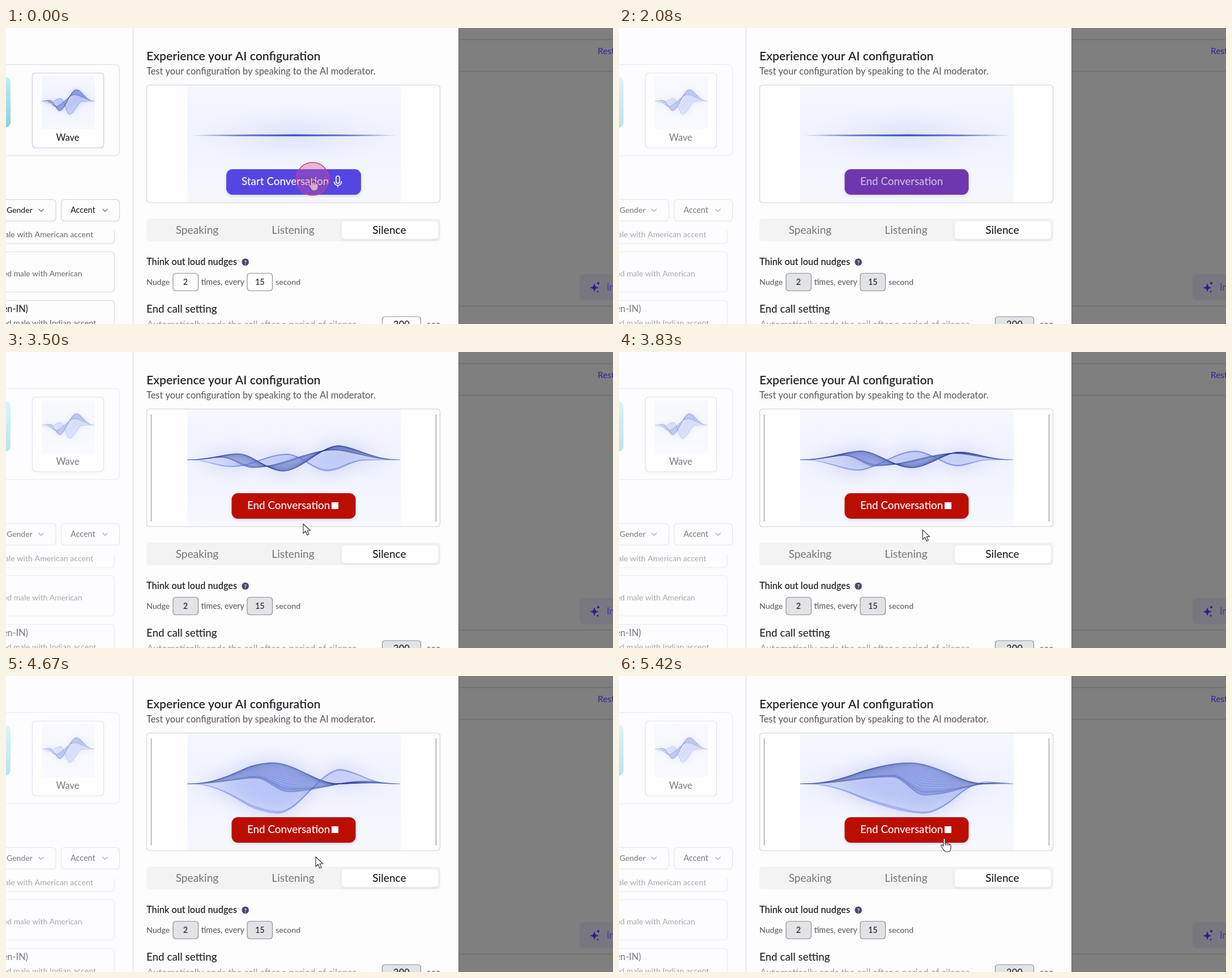
An HTML page with a canvas for the animation above (5.5 s loop, 1072 px wide and 522 px high).

```html
<!DOCTYPE html>
<html lang="en">
<head>
<meta charset="utf-8">
<title>Voice configuration test</title>
<style>
html, body { margin: 0; width: 100%; height: 100%; overflow: hidden; background: #fdfdfe; }
canvas { display: block; width: 1072px; height: 522px; }
</style>
</head>
<body>
<canvas id="stage" width="1072" height="522"></canvas>
<script>
const ctx = document.getElementById('stage').getContext('2d');
const LOOP = 5500, DISABLED_AT = 2080, VIDEO_AT = 2830, CURSOR_AT = 3420;
const INK = '#26262b', GREY = '#66666c', BORDER = '#dedee3';

const clamp = v => Math.max(0, Math.min(1, v));
const mix = (a, b, s) => a + (b - a) * s;
const smooth = s => s * s * (3 - 2 * s);
const linear = s => s;

function keyed(t, times, values, ease = smooth) {
  let i = 0;
  while (i < times.length - 2 && t > times[i + 1]) i++;
  return mix(values[i], values[i + 1], ease(clamp((t - times[i]) / (times[i + 1] - times[i]))));
}

function text(str, x, y, size, color = INK, weight = 400, align = 'left') {
  ctx.font = `${weight} ${size}px Lato, "Open Sans", sans-serif`;
  ctx.fillStyle = color;
  ctx.textAlign = align;
  ctx.fillText(str, x, y);
}

function box(x, y, w, h, r, fill, stroke, shadow) {
  ctx.save();
  ctx.beginPath();
  ctx.roundRect(x, y, w, h, r);
  if (shadow) {
    ctx.shadowColor = shadow;
    ctx.shadowBlur = 5;
    ctx.shadowOffsetY = 2;
  }
  if (fill) { ctx.fillStyle = fill; ctx.fill(); }
  ctx.shadowColor = 'transparent';
  if (stroke) { ctx.strokeStyle = stroke; ctx.lineWidth = 1.2; ctx.stroke(); }
  ctx.restore();
}

function line(points, color, width = 1) {
  ctx.beginPath();
  points.forEach(([x, y]) => ctx.lineTo(x, y));
  ctx.strokeStyle = color;
  ctx.lineWidth = width;
  ctx.stroke();
}

// Each crest: offset at 3 s, speed in px/s, heights at the key times.
const KEYS = [3000, 3500, 4170, 4670, 5420];
const TOP = [
  [58, 56, [6, 12, 20, 37, 37]],
  [127, 84, [-43, -20, -8, 0, 0]],
  [242, 54, [51, 25, 4, 2, 0]]
];
const MIDDLE = [
  [30, 55, [3, 6, 12, 10, 12]],
  [88, 54, [-25, -14, -8, -14, -20]],
  [232, 54, [27, 17, 6, 6, 4]]
];
const BOTTOM = [
  [30, 78, [-14, -15, -25, -52, -52]],
  [135, 82, [12, 10, 21, 26, 5]],
  [197, 100, [-60, -20, -3, 0, 0]],
  [288, 54, [-1, -1, 0, 0, 0]]
];
const SPAN = 377, STEP = 4;

// The envelope pinches both tails to a point.
function strand(crests, t) {
  const xs = [0], hs = [0], out = [];
  for (const [x, speed, heights] of crests) {
    xs.push(Math.min(x + speed * (t - 3000) / 1000, 374));
    hs.push(keyed(t, KEYS, heights));
  }
  xs.push(SPAN);
  hs.push(0);
  for (let u = 0; u <= SPAN + 1; u += STEP) {
    const tail = clamp(Math.min(u, SPAN - u) / 110);
    out.push(keyed(u, xs, hs) * Math.sqrt(tail));
  }
  return out;
}

function drawWave(t, x, y, sx, sy) {
  const [top, mid, low] = [TOP, MIDDLE, BOTTOM].map(c => strand(c, t));
  const trace = hs => hs.forEach((h, i) => ctx.lineTo(x + i * STEP * sx, y - h * sy));
  const fade = rgb => {
    const g = ctx.createLinearGradient(x, 0, x + SPAN * sx, 0);
    [[0, .1], [.12, .55], [.3, 1], [.75, 1], [.9, .4], [1, .05]]
      .forEach(([p, a]) => g.addColorStop(p, `rgba(${rgb},${a})`));
    return g;
  };
  const blend = (a, b, s) => a.map((h, i) => mix(h, b[i], s));
  const surface = (a, b, color, alpha, blur = 0) => {
    ctx.save();
    if (blur) ctx.filter = `blur(${blur}px)`;
    ctx.globalAlpha *= alpha;
    ctx.fillStyle = color;
    ctx.beginPath();
    trace(a);
    for (let i = b.length - 1; i >= 0; i--) ctx.lineTo(x + i * STEP * sx, y - b[i] * sy);
    ctx.fill();
    ctx.restore();
  };
  const threads = (a, b, count, color, alpha, power) => {
    ctx.save();
    ctx.globalAlpha *= alpha;
    ctx.strokeStyle = color;
    ctx.lineWidth = Math.max(.5, 1.3 * sx);
    for (let i = 0; i <= count; i++) {
      ctx.beginPath();
      trace(blend(a, b, (i / count) ** power));
      ctx.stroke();
    }
    ctx.restore();
  };
  const blue = fade('82,112,214'), navy = fade('38,58,142');
  surface(top, low, '#8c9ef5', .42, 16 * sx);
  surface(top, low, fade('130,152,240'), .16);
  surface(top, mid, blue, .34);
  threads(mid, low, 14, blue, .08, 1);
  threads(top, mid, 20, navy, .2, 2.2);
  threads(mid, blend(mid, top, .15), 3, navy, .2, 1);
  threads(low, blend(low, mid, .08), 4, blue, .26, 1);
}

function videoBackground(x, y, w, h) {
  const g = ctx.createLinearGradient(0, y, 0, y + h);
  g.addColorStop(0, '#f5f7fe');
  g.addColorStop(.43, '#f0f3fd');
  g.addColorStop(1, '#f6f8fe');
  ctx.fillStyle = g;
  ctx.fillRect(x, y, w, h);
}

function flatLine() {
  const glow = ctx.createRadialGradient(0, 0, 0, 0, 0, 180);
  glow.addColorStop(0, 'rgba(200,210,250,.5)');
  glow.addColorStop(1, 'rgba(225,231,252,0)');
  ctx.save();
  ctx.translate(508, 189);
  ctx.scale(1, .3);
  ctx.fillStyle = glow;
  ctx.fillRect(-180, -180, 360, 360);
  ctx.restore();
  const g = ctx.createLinearGradient(330, 0, 688, 0);
  [[0, .15], [.25, .8], [.5, 1], [.75, .8], [1, .15]]
    .forEach(([p, a]) => g.addColorStop(p, `rgba(63,91,190,${a})`));
  ctx.fillStyle = g;
  ctx.beginPath();
  ctx.ellipse(509, 189.3, 179, 1.7, 0, 0, 7);
  ctx.fill();
}

function clipped(x, y, w, h, draw) {
  ctx.save();
  ctx.beginPath();
  ctx.rect(x, y, w, h);
  ctx.clip();
  draw();
  ctx.restore();
}

function sparkle(x, y, r) {
  ctx.beginPath();
  ctx.moveTo(x, y - r);
  for (const [dx, dy] of [[1, 0], [0, 1], [-1, 0], [0, -1]])
    ctx.quadraticCurveTo(x, y, x + dx * r, y + dy * r);
  ctx.lineWidth = 1.5;
  ctx.strokeStyle = ctx.fillStyle = '#37188f';
  ctx.fill();
  ctx.stroke();
}

function backdrop() {
  ctx.fillStyle = '#7f7f7f';
  ctx.fillRect(799, 0, 273, 522);
  [20.5, 76.5, 490.5].forEach(y => line([[799, y], [1072, y]], '#707072', 1.3));
  text('Restart', 1045, 46, 15.4, '#392b91', 500);
  box(1013, 434, 90, 46, 8, '#78777f');
  sparkle(1039, 458, 6.5);
  sparkle(1046, 450, 2.2);
  sparkle(1045, 465, 1.5);
  text('Insights', 1061, 463, 16.5, '#483c96', 500);
  const g = ctx.createLinearGradient(799, 0, 803, 0);
  g.addColorStop(0, 'rgba(0,0,0,.08)');
  g.addColorStop(1, 'rgba(0,0,0,0)');
  ctx.fillStyle = g;
  ctx.fillRect(799, 0, 4, 522);
}

function chevron(x, y) {
  line([[x - 4.5, y - 2], [x, y + 2.5], [x + 4.5, y - 2]], '#77777d', 1.4);
}

function sidebar(disabled) {
  box(-20, 64.5, 220.5, 160.5, 8, null, BORDER);
  const teal = ctx.createLinearGradient(0, 86, 0, 176);
  teal.addColorStop(0, '#c3edf3');
  teal.addColorStop(1, '#83d3dc');
  box(-40, 86, 48, 90, 10, teal);
  box(46.5, 79.5, 126, 131.5, 6, '#fefeff', '#cfcdea', 'rgba(90,80,200,.08)');
  clipped(63, 85, 94, 93, () => {
    videoBackground(63, 85, 94, 93);
    drawWave(3000, 63, 129, .25, .4);
  });
  text('Wave', 109, 198.5, 16.4, INK, 500, 'center');

  box(-20, 302.5, 108, 38, 6, null, '#d5d5da');
  box(97.5, 302.5, 103, 38, 6, null, '#d5d5da');
  text('Gender', 1, 326, 14, INK, 500);
  text('Accent', 114, 326, 14.3, INK, 500);
  chevron(62, 321);
  chevron(175, 321);

  clipped(0, 357, 224, 165, () => {
    box(-20, 320, 211.5, 60, 6, null, BORDER);
    box(-20, 394.5, 211.5, 71, 6, null, BORDER);
    box(-20, 480.5, 211.5, 71, 6, null, BORDER);
    text('Female with American accent', 154, 368.5, 14.2, GREY, 400, 'right');
    text('Animated male with American', 134.5, 438, 13.9, GREY, 400, 'right');
    text('(en-IN)', 39, 501, 16.3, INK, 500, 'right');
    text('Animated male with Indian accent', 159, 524.5, 14.1, GREY, 400, 'right');
  });
  if (disabled) {
    ctx.fillStyle = 'rgba(253,253,254,.43)';
    ctx.fillRect(0, 0, 224, 522);
  }
  line([[224.5, 0], [224.5, 522]], '#dcdce0', 1.2);
}

function settings(disabled) {
  text('Experience your AI configuration', 248, 57, 21.2, INK, 600);
  text('Test your configuration by speaking to the AI moderator.', 248, 82, 16.4, '#55555b');

  box(248, 336, 519, 40, 6, '#f3f3f4');
  box(593, 341, 170, 31, 5, '#fff', null, 'rgba(0,0,0,.08)');
  text('Speaking', 337.5, 362.5, 19.2, '#77777c', 400, 'center');
  text('Listening', 507, 362.5, 19.1, '#77777c', 400, 'center');
  text('Silence', 677, 362.5, 19.1, '#1e1e22', 500, 'center');

  text('Think out loud nudges', 248, 417.5, 16.3, INK, 600);
  ctx.fillStyle = '#4b466c';
  ctx.beginPath();
  ctx.arc(422.7, 412.7, 6.3, 0, 7);
  ctx.fill();
  text('?', 422.7, 416.5, 10, '#fff', 700, 'center');

  const fill = disabled ? '#e2e3e6' : '#fefefe';
  box(295, 432.5, 44.5, 31, 5, fill, '#8f8f96');
  box(426, 432.5, 44.5, 31, 5, fill, '#8f8f96');
  box(664.5, 509, 68, 36, 5, fill, '#8f8f96');
  text('Nudge', 248, 453, 14.2, '#55555b');
  text('2', 317, 453, 14.5, INK, 500, 'center');
  text('times, every', 344.5, 453, 14.4, '#55555b');
  text('15', 448.3, 453, 14.5, INK, 500, 'center');
  text('second', 476, 453, 14.2, '#55555b');
  text('End call setting', 248, 501.5, 18.8, INK, 500);
  text('Automatically ends the call after a period of silence', 249, 529, 16.6, '#a0a0a5');
  text('300', 698.5, 528.5, 16.7, INK, 500, 'center');
  text('sec', 743, 528.5, 16.6, GREY);
}

function mic(x, y) {
  ctx.strokeStyle = '#fff';
  ctx.lineWidth = 1.7;
  ctx.beginPath();
  ctx.roundRect(x - 3, y - 10, 6, 13, 3);
  ctx.moveTo(x + 6.5, y - 1);
  ctx.arc(x, y, 6.5, 0, Math.PI);
  ctx.moveTo(x, y + 6.5);
  ctx.lineTo(x, y + 10);
  ctx.stroke();
}

function callButton(t) {
  if (t < DISABLED_AT) {
    box(389, 249, 238, 45, 11, '#5546e4', null, 'rgba(60,50,170,.2)');
    text('Start Conversation', 416, 277, 18.8, '#fff', 500);
    mic(586, 271);
    return;
  }
  const p = clamp((t - DISABLED_AT) / 230);
  const color = [[110, 187], [55, 14], [175, 0]].map(([a, b]) => Math.round(mix(a, b, p)));
  box(398.5, 249, 219, 45, 11, `rgb(${color})`, null, 'rgba(80,30,100,.16)');
  text('End Conversation', 426, 277, 18.8, `rgba(255,255,255,${mix(.66, 1, p)})`, 500);
  ctx.fillStyle = `rgba(255,255,255,${p})`;
  ctx.fillRect(575, 265, 12, 12);
}

function preview(t) {
  box(248.5, 100.5, 518, 207.5, 5, '#fefefe', '#d4d4da');
  clipped(320, 101, SPAN, 206, () => {
    videoBackground(320, 101, SPAN, 206);
    if (t < VIDEO_AT) flatLine();
    else drawWave(t, 320, 190, 1, 1);
  });
  if (t >= VIDEO_AT)
    [256.5, 759.5].forEach(x => line([[x, 110], [x, 299]], '#a9a9ae', 1.5));
  callButton(t);
}

const HAND = new Path2D('M0 1c0-2 3-2 3 0v8l1-1c1-1 3 0 3 1 1-1 3 0 3 1 1-1 3 0 3 2v5c0 3-2 6-5 6h-3c-3 0-4-2-5-4l-4-6c-1-2 1-3 2-2l2 2z');
const ARROW = new Path2D('M0 0v17l4-4 3 7 3-1.5-3-6.5h5.5z');

function pointer(shape, x, y) {
  ctx.save();
  ctx.translate(x, y);
  ctx.fillStyle = '#fff';
  ctx.strokeStyle = '#3a3a40';
  ctx.lineWidth = 1.2;
  ctx.lineJoin = 'round';
  ctx.fill(shape);
  ctx.stroke(shape);
  if (shape === HAND)
    [4, 7, 10].forEach(dx => line([[dx, 9], [dx, 12.5]], '#3a3a40'));
  ctx.restore();
}

const PATH_TIMES = [3420, 3500, 4000, 4170, 4670, 5170, 5420];
const PATH_X = [521, 525, 542, 543, 547, 548, 573];
const PATH_Y = [298, 303, 319, 320, 319, 318, 287];

function cursor(t) {
  if (t < 580) {
    ctx.save();
    ctx.globalAlpha = .8 * (1 - clamp((t - 250) / 330));
    pointer(HAND, 538, 264);
    ctx.globalAlpha = 1 - clamp((t - 80) / 420);
    ctx.beginPath();
    ctx.arc(541.3, 266, 29, 0, 7);
    ctx.fillStyle = 'rgba(205,75,145,.36)';
    ctx.strokeStyle = '#c5407f';
    ctx.lineWidth = 1.6;
    ctx.fill();
    ctx.stroke();
    ctx.restore();
  } else if (t >= CURSOR_AT) {
    const x = keyed(t, PATH_TIMES, PATH_X, linear);
    const y = keyed(t, PATH_TIMES, PATH_Y, linear);
    pointer(t > 5170 && y < 294 ? HAND : ARROW, x, y);
  }
}

function draw(now) {
  const t = now % LOOP, disabled = t >= DISABLED_AT;
  ctx.fillStyle = '#fdfdfe';
  ctx.fillRect(0, 0, 1072, 522);
  backdrop();
  sidebar(disabled);
  settings(disabled);
  preview(t);
  cursor(t);
}

let start;
function tick(now) {
  start ??= now;
  draw(now - start);
  requestAnimationFrame(tick);
}
requestAnimationFrame(tick);
</script>
</body>
</html>
```
